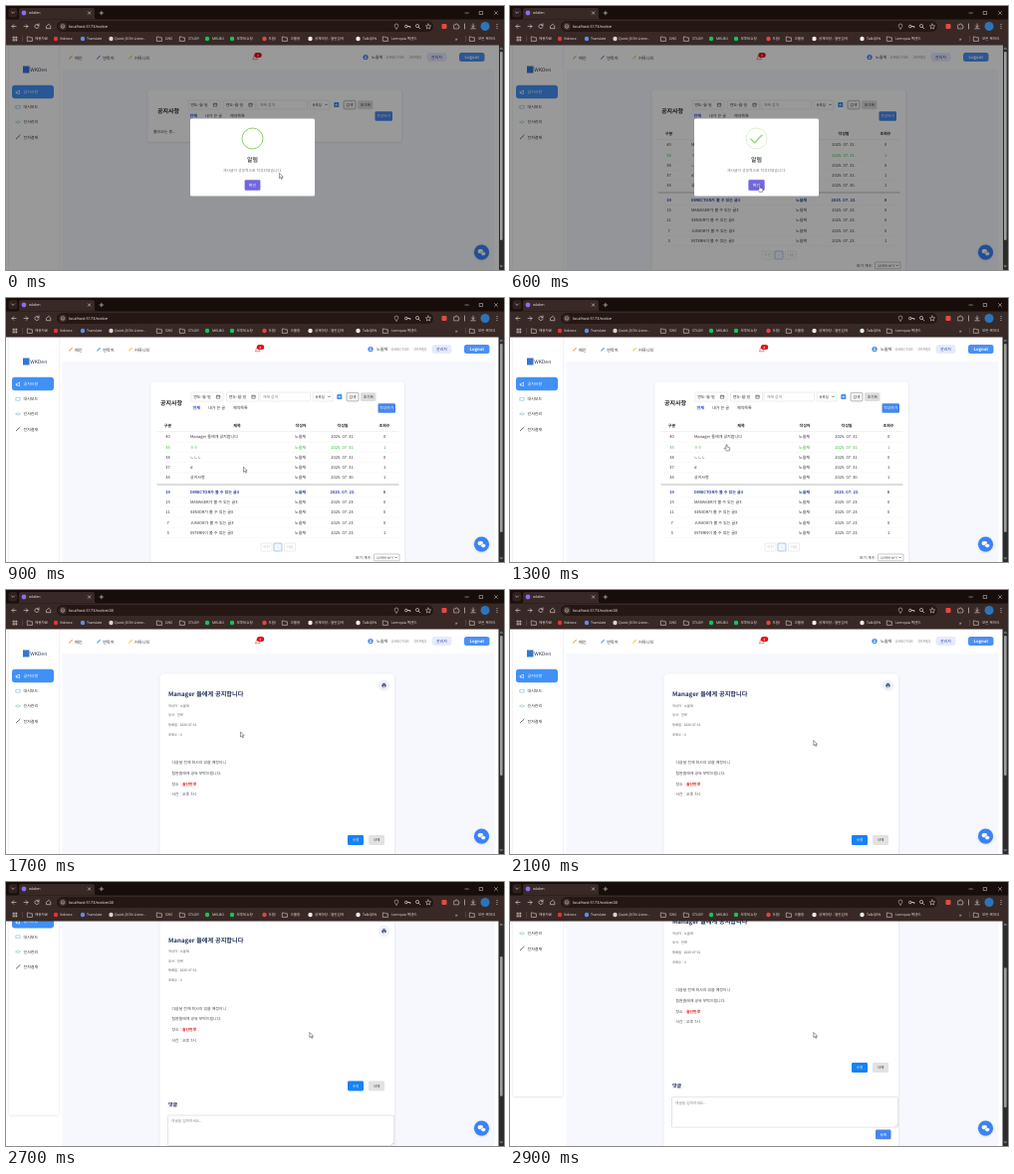
An HTML page that plays this animation: 500x266 px, repeating every 3000 ms.

```html
<!DOCTYPE html>
<html lang="ko">
<head>
<meta charset="utf-8">
<style>
html, body { margin: 0; width: 100%; height: 100%; overflow: hidden; background: #fff; }
svg { display: block; width: 500px; height: 266px; text-rendering: geometricPrecision;
  font-family: "Noto Sans CJK KR", "Noto Sans", sans-serif; }
#browser { font-family: "Noto Sans", "Noto Sans CJK KR", sans-serif; }
</style>
</head>
<body>
<svg id="stage" viewBox="0 0 500 266"></svg>
<script>
const MID = 'text-anchor="middle"', BOLD = 'font-weight="700"', BLUE = '#3b82f6';
const USER = '노을채';

// Drawing helpers; text is placed by its vertical centre.
const text = (x, y, size, str, fill = '#333', attrs = '') =>
  `<text x="${x}" y="${y + size * .36}" font-size="${size}" fill="${fill}" ${attrs}>${str}</text>`;
const rect = (x, y, w, h, fill, r = 0, attrs = '') =>
  `<rect x="${x}" y="${y}" width="${w}" height="${h}" rx="${r}" fill="${fill}" ${attrs}/>`;
const circle = (x, y, r, fill, attrs = '') => `<circle cx="${x}" cy="${y}" r="${r}" fill="${fill}" ${attrs}/>`;
const line = (d, stroke, width = .6, attrs = '') =>
  `<path d="${d}" fill="none" stroke="${stroke}" stroke-width="${width}" stroke-linecap="round" stroke-linejoin="round" ${attrs}/>`;
const group = (id, ...parts) => `<g id="${id}">${parts.join('')}</g>`;
const button = (x, y, w, h, label, fill, color = '#fff', size = 3.7, attrs = '') =>
  rect(x, y, w, h, fill, 1.3, attrs) + text(x + w / 2, y + h / 2, size, label, color, MID + ' font-weight="500"');
const field = (x, y, w, h, r = .8) => rect(x, y, w, h, '#fff', r, 'stroke="#ccc" stroke-width=".35"');

function browser() {
  const ink = '#e8dedb';
  const folder = x => line(`M${x - 2.3} 31h1.7l.7.8h2.3v3.6h-4.7z`, ink, .55);
  const marks = [
    [24, 0, 29, '채용자료'], [50, '#f03030', 54, 'Vidzora'], [77, '#5b92ee', 81, 'Translate'],
    [105.5, '#d9d2cc', 109, 'Quick JSON Lister...'], [154, 0, 160, 'DNS'], [177, 0, 183, 'STUDY'],
    [202, '#12c75b', 207, 'MELBO'], [227, '#12c75b', 231.5, '모루비쇼핑'], [259.5, '#e5453a', 263.5, '두림!'],
    [280, 0, 285.5, '크롤링'], [305.5, '#f1eeec', 310, '공제마당 - 열린검색'], [353.5, '#eee', 358, 'TalkQRN'],
    [381, 0, 387, 'Lernquia 백엔드'], [468, 0, 474, '모든 북마크']
  ];
  return group('browser',
    rect(0, 0, 500, 39.5, '#382926'),
    rect(0, 0, 500, 13.5, '#170e0c'),
    rect(2.5, 2, 9, 9.5, '#30211e', 2.5), line('M5.6 6l1.4 1.4L8.4 6', ink),
    `<path d="M11 13.5q2 0 2-2V4q0-2 2-2h72q2 0 2 2v7.500q0 2 2 2z" fill="#382926"/>`,
    circle(18, 7, 2.4, '#8b6cf5'), text(23, 7, 3.7, 'wkden', ink),
    line('M82.400 5.800l2.400 2.400m0-2.400l-2.400 2.400M94 7h3.600M95.800 5.200v3.600', ink),
    line('M461 7h3.400M475.600 5.500h3v3h-3zM490.500 5.500l3 3m0-3l-3 3', ink, .5),
    line('M10 20.500H6m1.800-1.800L6 20.500l1.800 1.800M18 20.500h4m-1.800-1.800l1.800 1.800l-1.800 1.800', ink),
    line('M32.800 19.300a2.100 2.100 0 1 0 .3 1.500M33 17.900v1.700h-1.700', ink),
    line('M40.800 20.200l2-1.900 2 1.900v2.500h-4z', ink),
    rect(51, 15, 378, 11, '#251714', 5.5),
    circle(57, 20.5, 3.7, '#3e2e2a'), circle(57, 20.5, 1.8, 'none', `stroke="${ink}" stroke-width=".5"`),
    line('M57 20.400v1', ink, .5),
    `<text id="url" x="63" y="22" font-size="3.9" fill="#f3ece9"></text>`,
    line('M392 23c-1.100-1.500-1.800-2.200-1.800-3.200a1.800 1.800 0 0 1 3.600 0c0 1-.7 1.700-1.800 3.200z', ink, .5),
    circle(401.8, 20.5, 1.3, 'none', `stroke="${ink}" stroke-width=".7"`), line('M403.200 20.500h2.600v1.200', ink, .8),
    circle(413, 20, 1.6, 'none', `stroke="${ink}" stroke-width=".6"`), line('M414.200 21.200l1.500 1.600', ink, .7),
    line('M424 18l.8 1.700 1.800.2-1.400 1.200.4 1.900-1.600-1-1.600 1 .4-1.900-1.400-1.200 1.800-.2z', ink, .5),
    rect(437.5, 18, 5, 5, '#e84a3f', 1),
    line('M450 19h1.400q0-1.300.8-1.300t.8 1.300h1.400v1.300q1 0 1 .7t-1 .7v1.200h-4.400z', ink, .5),
    line('M469 18v3.400m-1.500-1.500l1.500 1.500 1.500-1.500M466.800 22.800h4.400M460.500 18v5', ink, .6),
    circle(481, 20.5, 4.5, '#2f74b8'),
    [18.6, 20.5, 22.4].map(y => circle(493, y, .5, ink)).join(''),
    [0, 1, 2].map(i => [0, 1, 2].map(j => rect(6.7 + i * 1.7, 30.8 + j * 1.7, 1.1, 1.1, ink)).join('')).join(''),
    line('M16.500 30.500v5M461.500 30.500v5', '#7c6762', .4),
    ...marks.map(([x, color, tx, label]) =>
      (color ? circle(x, 33, 2.2, color) : folder(x)) + text(tx, 33, 3.55, label, ink)),
    text(451, 32.7, 5, '»', ink));
}

function header() {
  const nav = [[64.5, '#f2a65a', 69, '메인'], [92.5, '#5b9bf0', 97, '연락처'], [124.5, '#f3cc4b', 129, '커뮤니티']];
  return rect(53, 39, 441, 25, '#fff') +
    nav.map(([x, c, tx, label]) => line(`M${x - .8} 53.200l2.600-2.800`, c, 1.1) + text(tx, 52, 4.2, label)).join('') +
    group('bell', line('M248 53.500q.7-.7.700-2a1.500 1.500 0 0 1 3 0q0 1.300.7 2z', '#e35b58', .7),
      rect(249.3, 47, 7.4, 5, '#e60c12', 2.5), text(253, 49.5, 3, '0', '#fff', MID + BOLD)) +
    group('account',
      circle(361, 51.5, 2.6, BLUE), circle(361, 50.7, .8, '#fff'), rect(359.7, 51.9, 2.6, 1.2, '#fff', .6),
      text(367, 51.5, 4.1, USER), text(382, 51.5, 3.7, 'DIRECTOR', '#888'),
      text(404.5, 51.5, 3.7, '(마케팅)', '#888'),
      rect(422.5, 47, 20, 9, '#e6ebfc', 3), text(432.5, 51.5, 4, '관리자', '#344a9c', MID),
      rect(455, 47, 25.5, 9, '#4a90f5', 2.5), text(467.8, 51.5, 4.2, 'Logout', '#fff', MID + BOLD));
}

function sidebar() {
  const items = [['공지사항', '#fff'], ['대시보드', '#7eb6ee'], ['인사관리', '#72c3b4'], ['전자결재', '#58677a']];
  return rect(3, 20, 50, 261, '#fff', 1, 'filter="url(#shadow)"') +
    rect(17, 60.5, 6.500, 7, '#3477d4') + text(24.3, 64, 5, 'WKDen', '#27384f', 'font-weight="500"') +
    rect(6, 79.700, 42, 13.5, '#4090f6', 3) +
    items.map(([label, c], i) => {
      const y = 86.5 + i * 15.2;
      const icon = [`M10 ${y + .3}l3.500-1.800v3.400zM10.800 ${y + .6}v1.400`, `M10.200 ${y - 1.300}h4v2.800h-4z`,
        `M10 ${y}q2.200-2.800 4.400 0q-2.200 2.800-4.400 0z`, `M10.300 ${y + 1.700}l3.800-3.600`][i];
      return line(icon, c, i === 3 ? 1 : .6) + text(17.5, y, 4, label, i ? '#333' : '#fff', i ? '' : 'font-weight="500"');
    }).join('');
}

function filters() {
  const date = x => field(x, 95, 32, 9) + text(x + 2.2, 99.5, 4, '연도-월-일') +
    line(`M${x + 25.700} 98.200h3v3h-3zM${x + 25.700} 98.900h3`, '#333', .5);
  return text(152, 105.5, 6, '공지사항', '#222', BOLD) + date(183) + date(218.5) +
    field(252, 95, 50.5, 9) + text(255, 99.5, 3.8, '제목 검색', '#888') +
    field(305, 95, 20, 9) + text(307.5, 99.5, 3.4, '등록일') + line('M320.500 99l1 1 1-1', '#333', .6) +
    rect(329.3, 97, 5, 5, '#3f8ae8', .8) + line('M330.600 99.500h2.400m-1.200-1.200v2.400', '#fff', .5) +
    button(339, 95.3, 12, 8.6, '검색', '#f5f5f5', '#333', 3.7, 'stroke="#777" stroke-width=".5"') +
    button(353, 95.3, 15.5, 8.6, '초기화', '#ddd', '#333') +
    text(184.5, 111, 4, '전체', '#2442d8', BOLD) + text(200, 111, 4, '내가 쓴 글') + text(225, 111, 4, '예약목록') +
    button(370.5, 106.3, 17.5, 9.4, '작성하기', '#4586ee', '#fff', 3.8);
}

function table() {
  const rank = (id, who) => [id, who + ' 볼 수 있는 글3', 23, 0];
  const rows = [[40, 'Manager 들에게 공지합니다', 31, 0], [35, 'ㅎㅎ', 31, 1], [38, 'ㄴㄴㄴ', 31, 0], [37, 'd', 31, 1],
    [34, '공지사항', 30, 1], rank(19, 'DIRECTOR가'), rank(15, 'MANAGER가'), rank(11, 'SENIOR가'),
    rank(7, 'JUNIOR가'), [3, 'INTERN이 볼 수 있는 글3', 23, 1]];
  const cells = ([id, title, day, views], i) => {
    const y = 140 + i * 10.25 + (i > 4 ? 4.2 : 0);
    const color = i === 1 ? '#2fb52f' : i === 5 ? '#263f9b' : '#333';
    const weight = i === 5 ? BOLD : '';
    const cell = (x, str) => text(x, y, 4, str, color, MID + weight);
    return cell(159.5, id) + text(182, y, 4, title, color, weight) + cell(292.5, USER) +
      cell(335, `2025. 07. ${day}.`) + cell(377, views) + line(`M149 ${y + 5.100}H391`, '#eee', .3);
  };
  return [[159.5, '구분'], [229, '제목'], [293, '작성자'], [335, '작성일'], [377, '조회수']]
    .map(([x, label]) => text(x, 129, 4, label, '#222', MID + BOLD)).join('') +
    line('M149 134.500H391', '#ddd', .4) + rows.map(cells).join('') + line('M149 188H391', '#777', .5) +
    [[253, 11, '이전'], [276.5, 11, '다음']].map(([x, w, label]) =>
      field(x, 247, w, 8) + text(x + w / 2, 251, 3.5, label, '#bbb', MID)).join('') +
    rect(266, 247, 8, 8, '#f4f8ff', .8, 'stroke="#6a8fc0" stroke-width=".5"') + text(270, 251, 3.5, '1', '#bcd0ee', MID) +
    text(348, 261.5, 3.8, '보기 개수:') + rect(366.5, 258, 25.500, 6.8, '#fff', .6, 'stroke="#777" stroke-width=".4"') +
    text(369, 261.4, 3.3, '10개씩 보기') + line('M387.700 261l1 1 1-1', '#333', .6);
}

function detail() {
  const meta = ['작성자 : ' + USER, '부서 : 전략', '등록일 : 2025-07-31', '조회수 : 0'];
  const body = ['다음달 전체 회사의 있을 예정이니', '팀원들에게 공유 부탁드립니다.',
    `장소 : <tspan fill="#e02020" ${BOLD}>솔단만루</tspan>`, '시간 : 오후 7시'];
  return rect(154.700, 84.500, 235.300, 262, '#fff', 4, 'filter="url(#shadow)"') +
    circle(379.500, 96, 5.300, '#f0f2fb', 'stroke="#dfe3f0" stroke-width=".4"') +
    rect(377.300, 95.200, 4.400, 2.400, '#34466e', .5) + rect(378.200, 93.900, 2.600, 1, '#34466e') +
    rect(378.400, 96.500, 2.200, 1.600, '#fff', 0, 'stroke="#34466e" stroke-width=".4"') +
    text(163, 105, 6.2, 'Manager 들에게 공지합니다', '#24345c', BOLD) +
    meta.map((s, i) => text(163, 116.4 + i * 9.75, 3.25, s, '#555')).join('') +
    body.map((s, i) => text(166.500, 174 + i * 10.6, 3.9, s, '#444')).join('') +
    button(343, 247, 16, 10, '수정', '#1683f5', '#fff', 3.6) + button(364, 247, 16, 10, '삭제', '#e2e2e2', '#333', 3.6) +
    text(163, 270.500, 5, '댓글', '#24345c', BOLD) +
    rect(162.500, 281.700, 227, 30.500, '#fff', 1, 'stroke="#bbb" stroke-width=".4"') +
    line('M387.300 311.200l1.500-1.500', '#888', .4) +
    text(166, 287.500, 3.7, '댓글을 입력하세요...', '#888') +
    button(367, 314.500, 15.500, 9.700, '등록', '#4586ee', '#fff', 3.6);
}

function modal() {
  return group('modal', rect(0, 39, 494, 227, '#000', 0, 'opacity=".4"'),
    group('dialog', rect(185, 113.500, 125, 78, '#fff', 1.600),
      circle(247.5, 133.500, 10.5, 'none', 'id="ring" stroke="#8ccf68" stroke-width="1"'),
      line('M242 134.200l3.600 3.600 7.400-7.800', '#9ad879', 1.500, 'id="check" pathLength="1" stroke-dasharray="1 2"'),
      text(247.5, 155, 6, '알림', '#545454', MID + 'font-weight="600"'),
      text(247.5, 165.500, 3.8, '게시글이 성공적으로 작성되었습니다.', '#777', MID),
      rect(239, 174.700, 17, 11.600, '#c9c4f4', 1.800, 'id="focus"'),
      button(239.600, 175.300, 15.800, 10.400, '확인', '#7066e0', '#fff', 4)));
}

const $ = id => document.getElementById(id);
$('stage').innerHTML =
  `<defs><filter id="shadow" x="-10%" y="-10%" width="120%" height="120%">
    <feDropShadow dx="0" dy=".6" stdDeviation="1.2" flood-opacity=".13"/></filter></defs>` +
  group('page', rect(0, 39, 494, 400, '#fff'), rect(56.500, 64, 434, 370, '#f6f8fd'), header(), sidebar(),
    group('list', `<rect id="card" x="142.500" y="84.800" width="254.500" rx="3" fill="#fff" filter="url(#shadow)"/>`,
      filters(), group('table', table()), group('loading', text(148, 127, 3.9, '불러오는 중...'))),
    group('detail', detail())) +
  circle(477.500, 248.200, 7.600, BLUE, 'filter="url(#shadow)"') +
  rect(473.700, 245, 5.400, 4.300, '#fff', 2) + rect(476.800, 247.700, 4.800, 3.700, '#fff', 1.800, `stroke="${BLUE}" stroke-width=".5"`) +
  modal() +
  rect(494.500, 39, 5.500, 227, '#2c2c2c') + line('M496.300 43l1-1.200 1 1.200zM496.300 262l1 1.200 1-1.200z', '#9f9f9f', .6) +
  rect(496, 46, 2.600, 190, '#9f9f9f', 1.3, 'id="thumb"') + browser() +
  group('cursor',
    `<path id="arrow" d="M0 0v5.200l1.200-1.100.9 1.900.9-.4-.9-1.800h1.700z" fill="#fff" stroke="#222" stroke-width=".45"/>`,
    `<path id="hand" d="M-.6.300q.6-.6 1.200 0v2l2.300.6q.6.300.4 1.200l-.5 2.200h-3.100l-2-2.500q.2-.8.900-.4l.8.700z" fill="#fff" stroke="#222" stroke-width=".45"/>`);

const clamp = v => Math.max(0, Math.min(1, v));
const show = (id, on) => $(id).style.display = on ? '' : 'none';
const move = (id, x, y = 0) => $(id).setAttribute('transform', `translate(${x} ${y})`);

// Linear interpolation through [time, value] points.
function track(points, t) {
  const i = points.findIndex(p => p[0] > t);
  if (i < 0) return points[points.length - 1][1];
  if (i === 0) return points[0][1];
  const [t0, a] = points[i - 1], [t1, b] = points[i];
  return a + (b - a) * (t - t0) / (t1 - t0);
}
const cursorX = [[0, 274.500], [500, 250.700], [600, 250.700], [700, 249], [1300, 217.500], [1500, 212], [1600, 212], [2000, 304.800]];
const cursorY = [[0, 168.500], [500, 181], [600, 181], [700, 181.500], [1300, 147.700], [1500, 140], [1600, 140], [2000, 151.500]];
const scrolled = [[2300, 0], [2400, 6], [2500, 28], [2900, 65]];

function draw(now) {
  const t = now % 3000;
  const loading = t < 100, reading = t >= 1600, wide = t >= 800;
  const scroll = track(scrolled, t);

  show('list', !reading);
  show('detail', reading);
  show('loading', loading);
  show('table', !loading);
  $('card').setAttribute('height', loading ? 52 : 200);
  move('list', wide ? 3 : 0);
  move('bell', wide ? 2.5 : 0);
  move('account', wide ? 5 : 0);
  move('page', 0, -scroll);
  $('thumb').setAttribute('y', 46 + scroll * .62);
  $('thumb').setAttribute('height', reading ? 141 : 190);
  $('url').textContent = 'localhost:5173/notice' + (reading ? '/40' : '');

  const hide = clamp((t - 620) / 80);
  show('modal', hide < 1);
  $('modal').style.opacity = 1 - hide;
  $('ring').style.opacity = 1 - .7 * clamp(t / 300);
  show('check', t >= 100);
  $('check').setAttribute('stroke-dashoffset', 1 - clamp((t - 100) / 300));

  const pointing = t >= 400 && t < 650 || t >= 1100 && t < 1600;
  show('focus', t >= 400);
  show('hand', pointing);
  show('arrow', !pointing);
  move('cursor', track(cursorX, t), track(cursorY, t));
}

const start = performance.now();
function tick() {
  draw(performance.now() - start);
  requestAnimationFrame(tick);
}
tick();
</script>
</body>
</html>
```
